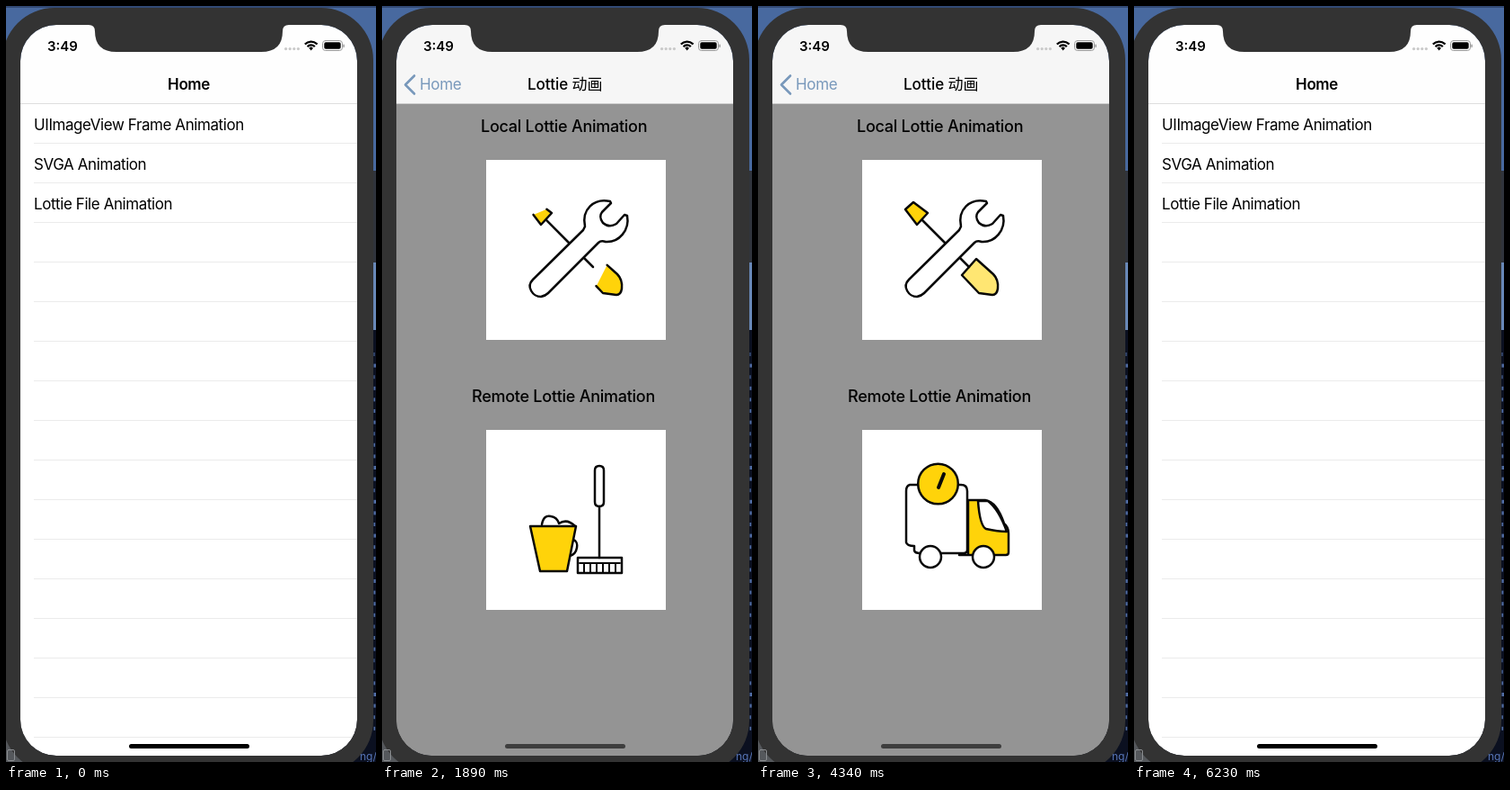
Animation, 412 px wide and 840 px high, one loop 6.58 s. Source, as an HTML page with a canvas:

```html
<!DOCTYPE html>
<html lang="en">
<head>
<meta charset="utf-8">
<title>Lottie demo</title>
<style>
html, body { margin: 0; width: 100%; height: 100%; overflow: hidden; background: #333; }
canvas { display: block; }
</style>
</head>
<body>
<canvas id="stage" width="412" height="840"></canvas>
<script>
const ctx = document.getElementById('stage').getContext('2d');
const LOOP = 6580, STEP = 70, LAST = 6230;
const LEFT = 16, RIGHT = 391, WIDTH = RIGHT - LEFT;
const YELLOW = '#ffd30a', INK = '#080808', BLUE = '#7898bb';
const FONT = 'Inter, "Noto Sans CJK SC", "Noto Sans CJK", sans-serif';

const clamp = v => Math.max(0, Math.min(1, v));
const ramp = (v, a, b) => clamp((v - a) / (b - a));
const mix = (a, b, k) => a + (b - a) * k;
const grey = v => `rgb(${v},${v},${v})`;

function text(s, x, y, size, weight, color = '#000', spacing = 0, align = 'left') {
  ctx.font = `${weight} ${size}px ${FONT}`;
  ctx.letterSpacing = spacing + 'px';
  ctx.textAlign = align;
  ctx.fillStyle = color;
  ctx.fillText(s, x, y);
}

function rect(x, y, w, h, color, r = 0) {
  ctx.fillStyle = color;
  ctx.beginPath();
  ctx.roundRect(x, y, w, h, r);
  ctx.fill();
}

function line(d, color, width) {
  ctx.strokeStyle = color;
  ctx.lineWidth = width;
  ctx.stroke(new Path2D(d));
}

// Icon parts: draw window [a, b], erase window [c, d], point the erase closes on.
function part(d, fill, draw = [0, 0.15], erase = [0.9, 1], pivot = 1, weight = 2.5) {
  const el = document.createElementNS('http://www.w3.org/2000/svg', 'path');
  el.setAttribute('d', d);
  return { el, path: new Path2D(d), len: el.getTotalLength(), fill, draw, erase, pivot, weight };
}

const circle = (x, y, r) => `M${x - r} ${y}a${r} ${r} 0 1 1 ${2 * r} 0a${r} ${r} 0 1 1 ${-2 * r} 0Z`;
const box = (x, y, w, h) => `M${x} ${y}h${w}v${h}h${-w}Z`;
const LATE = [0.96, 1];

function drawPart(p, u) {
  const out = ramp(u, ...p.erase);
  const from = out * p.pivot;
  const to = ramp(u, ...p.draw) * (1 - out * (1 - p.pivot));
  if (to - from < 0.005) return;
  if (p.fill) {
    ctx.globalAlpha = p.fill === '#fff' ? 1 : ramp(u, p.draw[1] - 0.04, p.draw[1] + 0.04) * ramp(1 - u, 0, 0.06);
    ctx.fillStyle = p.fill;
    if (to - from > 0.995) ctx.fill(p.path);
    else {
      ctx.beginPath();
      for (let i = 0; i <= 40; i++) {
        const q = p.el.getPointAtLength(p.len * mix(from, to, i / 40));
        ctx.lineTo(q.x, q.y);
      }
      ctx.fill();
    }
    ctx.globalAlpha = 1;
  }
  if (!p.weight) return;
  ctx.strokeStyle = INK;
  ctx.lineWidth = p.weight;
  if (to - from < 0.995) {
    ctx.setLineDash([p.len * (to - from), p.len * 2]);
    ctx.lineDashOffset = -p.len * from;
  }
  ctx.stroke(p.path);
  ctx.setLineDash([]);
}

const tools = [
  part('M127 110L146 127Q152 133 151 143Q150 150 145 150L130 148L111 128Z', YELLOW, [0, 0.2], [0.75, 1], 0.2),
  part('M66 66L92 92', null, [0, 0.08], [0.85, 1]),
  part('M109 109L119 119', null, [0.1, 0.15], LATE),
  part('M57 47L73 59L61 72L48 55Z', YELLOW, [0, 0.11], [0.8, 0.925], 0.4),
  part('M138 46C120 42 106 55 110 74L108 78L52 133C44 141 52 152 61 152Q66 151 69 148L125 92Q128 89 133 91C148 92 160 78 157 62L154 61L145 71Q137 76 130 70Q125 63 129 58L139 48Z', '#fff', [0, 0.06], LATE)
];

const bucket = [
  part('M97 122C104 124 102 138 93 140', null, [0.08, 0.28], LATE),
  part('M62 105Q64 94 72 96Q79 97 81 104Q90 98 99 107', null, [0.16, 0.3], LATE),
  part('M49 107H100L90 157H60Z', YELLOW, [0, 0.1], LATE),
  part('M126 85Q131 85 131 80V45Q131 40 126 40Q121 40 121 45V80Q121 85 126 85Z', null, [0, 0.18], LATE),
  part('M126 142V85', null, [0, 0.22], LATE),
  part(box(102, 142, 49, 17), null, [0, 0.1], LATE),
  part('M104 148H149', null, [0, 0.16], LATE, 1, 2),
  ...[1, 2, 3, 4, 5, 6].map(i => part(`M${102 + i * 7} 149V158`, null, [0, 0.12], LATE, 1, 2))
];

const truck = [
  part('M108 139H118V78H137Q150 80 158 104Q163 108 163 115V136Q163 139 160 139H118Z', YELLOW),
  part('M129 79H140Q152 88 161 113Q151 113 138 110Q131 107 129 79Z', '#fff'),
  part('M62 61H53Q49 62 49 68V125Q50 129 58 129V134Q59 137 64 137H113Q117 137 117 133V68Q117 61 110 61H104Z', '#fff'),
  part(circle(76, 141, 12), '#fff'),
  part(circle(135, 141, 12), '#fff'),
  part(circle(84.5, 60, 22.3), YELLOW),
  part('M85 64L91 49', null, [0.05, 0.2], [0.9, 1], 1, 4)
];

const cooler = [
  part('M45 73H157V91Q157 98 150 98H52Q45 98 45 91Z', YELLOW, [0.05, 0.2], LATE, 1, 0),
  part('M52 50H150Q158 50 158 58V91Q158 99 150 99H52Q44 99 44 91V58Q44 50 52 50Z', null),
  part('M55 78H147', null, [0.1, 0.25], [0.9, 1], 1, 2.8),
  part('M55 89H147', null, [0.1, 0.25], [0.9, 1], 1, 2.8),
  ...[[0, 0], [17, 3], [33, 0]].map(([x, y]) =>
    part(`M${66 + x} ${113 + y}Q${57 + x} ${120 + y} ${64 + x} ${126 + y}Q${70 + x} ${133 + y} ${62 + x} ${141 + y}`, null, [0.15, 0.35], [0.9, 1], 1, 2.8)),
  ...[90, 30, 150].map(deg => {
    const a = deg * Math.PI / 180, x = 13 * Math.cos(a), y = 13 * Math.sin(a);
    return part(`M${129 - x} ${130 - y}L${129 + x} ${130 + y}`, null, [0.2, 0.35]);
  })
];

const wheel = [
  part(circle(102, 94.5, 55.2), null),
  part(circle(102, 94.5, 43.5), null),
  part(box(59, 89, 20, 10), YELLOW),
  part(box(123, 89, 22, 10), YELLOW),
  part(box(93, 120, 14, 19), YELLOW),
  part('M82 82H122L125 95L110 120H92L77 95Z', YELLOW)
];

// Each icon runs until the next one starts.
const localPlan = [[1290, tools], [1990, truck], [2800, cooler], [3520, wheel], [4200, tools], [4880, bucket], [5560, truck], [6240]];
const remotePlan = [[780, tools], [1460, bucket], [2140, truck], [2450, tools], [3130, bucket], [3810, truck], [4490, cooler], [5170, wheel], [5850]];

function panel(plan, x, y, t) {
  rect(x, y, 200, 200, '#fff');
  const i = plan.findIndex((s, k) => t >= s[0] && plan[k + 1] && t < plan[k + 1][0]);
  if (i < 0) return;
  const u = (t - plan[i][0]) / (plan[i + 1][0] - plan[i][0]);
  ctx.save();
  ctx.translate(x, y);
  for (const p of plan[i][1]) drawPart(p, u);
  ctx.restore();
}

// Share of the detail page still off screen.
function spring(ms) {
  const k = Math.max(0, ms) * 0.012;
  return (1 + k) * Math.exp(-k);
}
function away(t) {
  if (t < 1050) return 1;
  if (t < 5300) {
    const p = spring(t - 1050);
    return p < 0.004 ? 0 : p;
  }
  const p = 1 - spring(t - 5300);
  return p > 0.996 ? 1 : p;
}

function home(p) {
  const x = LEFT - (1 - p) * WIDTH * 0.3;
  rect(LEFT, 109, WIDTH, 731, '#fff');
  ['UIImageView Frame Animation', 'SVGA Animation', 'Lottie File Animation'].forEach((s, i) =>
    text(s, x + 15, 137.5 + i * 44, 17, 400, '#000', -0.42));
  for (let y = 152; y < 830; y += 44) rect(x + 15, y, WIDTH, 1, '#ebebeb');
  rect(LEFT, 109, WIDTH, 731, `rgba(0,0,0,${0.07 * (1 - p)})`);
}

function detail(p, t) {
  const x = LEFT + Math.round(p * WIDTH);
  rect(x, 109, WIDTH, 731, '#949494');
  text('Local Lottie Animation', x + 94, 139.5, 18, 500, '#000', -0.26);
  text('Remote Lottie Animation', x + 84, 439.5, 18, 500, '#000', -0.26);
  panel(localPlan, x + 100, 171, t);
  panel(remotePlan, x + 100, 471, t);
}

function navBar(p) {
  rect(LEFT, 0, WIDTH, 109, grey(Math.round(mix(246, 254, p))));
  rect(LEFT, 108, WIDTH, 1, grey(Math.round(mix(205, 222, p))));
  ctx.globalAlpha = clamp(p * 1.6 - 0.4);
  text('Home', 203.5 - 139 * (1 - p), 93, 17, 600, '#000', -0.4, 'center');
  ctx.globalAlpha = 1 - p;
  line('M36 77.5L26 87.5L36 97.5', BLUE, 2.6);
  ctx.globalAlpha = clamp(1.4 - p * 1.6);
  text('Home', 42 + 139 * p, 93, 17, 400, BLUE, -0.3);
  ctx.globalAlpha = 1 - p;
  text('Lottie 动画', 162 + 223 * p, 93, 17, 500, '#000', -0.1);
  ctx.globalAlpha = 1;
}

function statusBar() {
  text('3:49', 46, 49.5, 15, 600);
  for (let i = 0; i < 4; i++) rect(310 + i * 4.6, 46, 3.2, 3.2, '#c9c9c9', 1.6);
  ctx.strokeStyle = '#000';
  ctx.lineWidth = 2.2;
  ctx.lineCap = 'butt';
  for (const r of [5.6, 9.4]) {
    ctx.beginPath();
    ctx.arc(339.7, 49, r, -Math.PI * 0.76, -Math.PI * 0.24);
    ctx.stroke();
  }
  ctx.fillStyle = '#000';
  ctx.beginPath();
  ctx.moveTo(339.7, 49.5);
  ctx.arc(339.7, 49, 3.2, -Math.PI * 0.76, -Math.PI * 0.24);
  ctx.fill();
  ctx.lineCap = 'round';
  ctx.strokeStyle = '#999';
  ctx.lineWidth = 1;
  ctx.beginPath();
  ctx.roundRect(352.5, 38.5, 22, 11, 3.2);
  ctx.stroke();
  rect(354.3, 40.3, 18.4, 7.4, '#000', 1.8);
  rect(375.4, 42.5, 1.4, 3.6, '#999', 0.7);
}

function desktop() {
  rect(0, 0, 412, 840, '#0b1020');
  rect(0, 0, 412, 183, '#48699f');
  rect(0, 0, 412, 2, '#324a75');
  rect(405, 183, 7, 102, '#30343c');
  rect(405, 285, 7, 75, '#6888b8');
  for (let i = 0; i < 34; i++) {
    const n = Math.sin(i * 12.9898) * 43758.5453;
    rect(409.5, 385 + i * 12.6, 1 + 1.5 * (n - Math.floor(n)), 4, '#5370a8');
  }
  rect(0, 780, 30, 60, '#55585c');
  rect(385, 820, 27, 20, '#0b1020');
}

function bezel() {
  const ring = new Path2D();
  ring.roundRect(-4, 2, 413, 850, 58);
  ring.roundRect(LEFT, 21, WIDTH, 812, 40);
  ctx.fillStyle = '#333';
  ctx.fill(ring, 'evenodd');
  ctx.fill(new Path2D('M92 20V21Q99 21 99 28Q99 51 123 51H284Q308 51 308 28Q308 21 315 21V20Z'));
  ctx.strokeStyle = '#8b8e91';
  ctx.lineWidth = 1;
  ctx.beginPath();
  ctx.roundRect(1.5, 826.5, 8, 12, 1.5);
  ctx.stroke();
  text('ng/', 394, 838, 12, 400, '#5674b5');
}

function draw(t) {
  const p = away(t);
  ctx.lineJoin = ctx.lineCap = 'round';
  desktop();
  ctx.save();
  ctx.beginPath();
  ctx.roundRect(LEFT, 21, WIDTH, 812, 40);
  ctx.clip();
  home(p);
  if (p < 1) detail(p, t);
  navBar(p);
  statusBar();
  rect(137, 820, 134, 5, grey(Math.round(62 * ramp(1 - p, 0.2, 0.9))), 2.5);
  ctx.restore();
  bezel();
}

function tick() {
  const t = performance.now() % LOOP;
  draw(Math.min(LAST, Math.floor(t / STEP) * STEP));
  requestAnimationFrame(tick);
}
tick();
</script>
</body>
</html>
```
